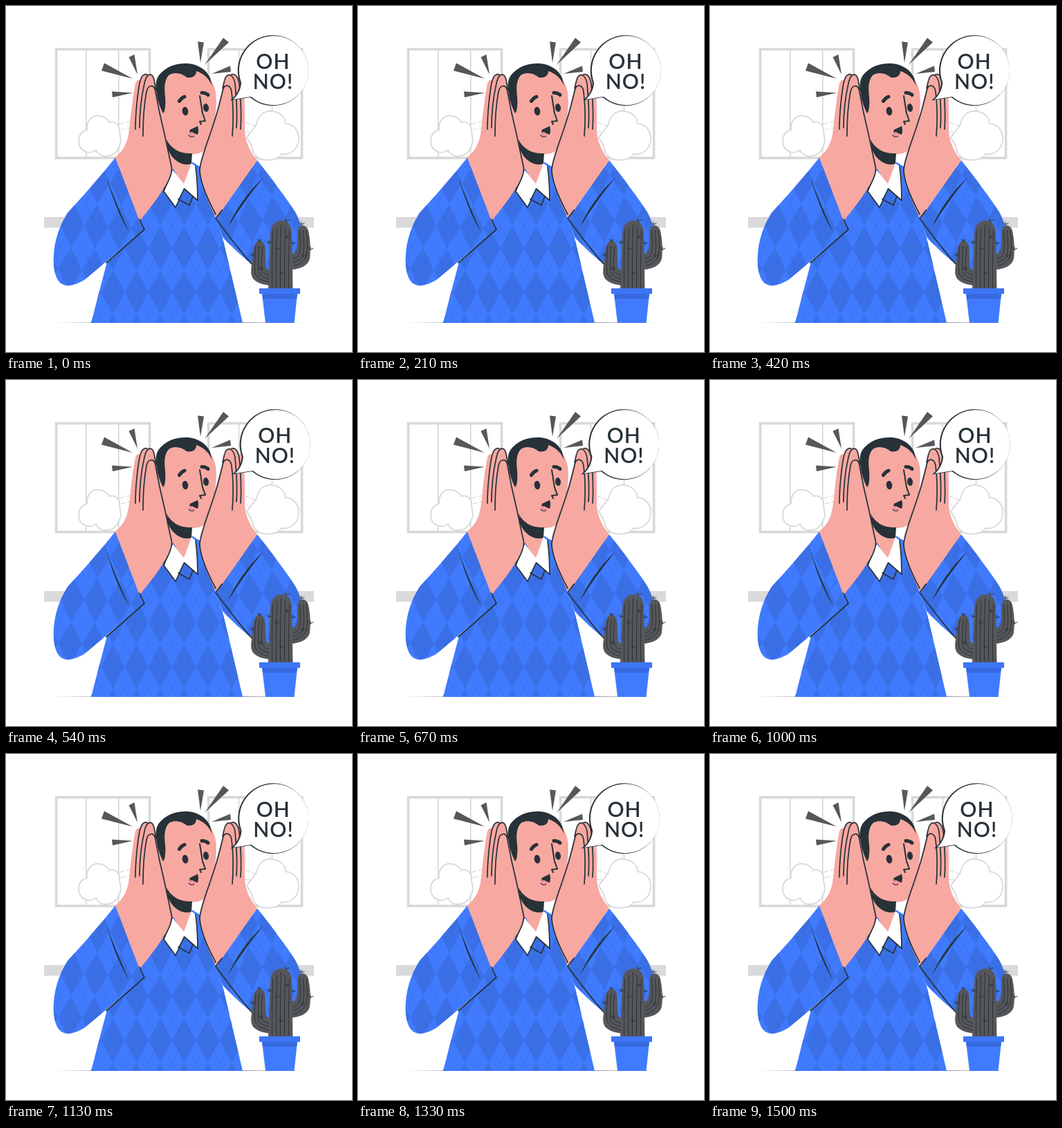
An HTML page that plays this animation: 500 by 500 pixels, repeating every 1540 ms.

```html
<!DOCTYPE html>
<html lang="en">
<head>
<meta charset="utf-8">
<title>Oh no!</title>
<style>
  html, body { margin: 0; width: 100%; height: 100%; overflow: hidden; background: #fff; }
  svg { display: block; width: 100vw; height: 100vh; }
  .ink { fill: none; stroke: #263238; stroke-width: 1.7; stroke-linecap: round; stroke-linejoin: round; }
  .dark { fill: #263238; }
  .skin { fill: #f7a8a1; }
  .blue { fill: #407bff; }
  .deep { fill: #3a6fe6; }
  .gray { fill: #55575b; }
  .white { fill: #fff; }
  .frame { fill: none; stroke: #d8d8db; stroke-width: 3.6; }
  .thin { fill: none; stroke: #d4d4d8; stroke-width: 1.5; }
  .rib { fill: none; stroke: #2d3238; stroke-width: 1; stroke-linecap: round; }
  text { font: 600 30px Lato, "Open Sans", sans-serif; letter-spacing: 1px; fill: #263238; }
</style>
</head>
<body>
<svg viewBox="0 0 500 500">
  <defs>
    <g id="argyle">
      <path class="deep" d="M17.150 0L34.300 32L17.150 64L0 32Z"/>
      <path d="M0 0L34.300 64M34.300 0L0 64" fill="none" stroke="#3464cf" stroke-width=".7" opacity=".7"/>
    </g>
    <pattern id="knit" width="34.300" height="64" patternUnits="userSpaceOnUse" patternTransform="translate(205.800 318)">
      <use href="#argyle"/>
    </pattern>
    <pattern id="knitL" width="34.300" height="64" patternUnits="userSpaceOnUse" patternTransform="translate(77 348) rotate(3)">
      <use href="#argyle"/>
    </pattern>
    <pattern id="knitR" width="34.300" height="64" patternUnits="userSpaceOnUse" patternTransform="translate(333 280) rotate(-6)">
      <use href="#argyle"/>
    </pattern>
    <path id="torso" d="M240 236L193 311L200 323L146 370Q137 404 123 458H342L313 335L303 307L280 232L270 226Z"/>
    <path id="armL" d="M158 219C137 246 110 276 89 299C73 324 68 350 69 372C70 393 77 404 90 404C99 403 106 400 113 396L200 323Z"/>
    <path id="armR" d="M363 223C384 250 404 276 418 298C425 311 429 325 430 340C430 366 418 385 396 389C382 389 368 381 355 373C338 359 322 344 313 334L303 307Z"/>
    <path id="balloon" d="M353 131L327 135C333 130 338 122 339 111A50 50 0 1 1 353 131Z"/>
  </defs>

  <!-- room -->
  <g id="room">
    <rect class="frame" x="72.6" y="62.6" width="135" height="157"/>
    <rect class="frame" x="292.6" y="62.6" width="135" height="157"/>
    <path class="thin" d="M115.8 64V218M162.8 64V218M336.5 64V218M384.5 64V218"/>
    <rect x="55" y="305" width="390" height="15.5" fill="#dadadc"/>
    <g fill="#fff" stroke="#d4d4d8" stroke-width="1.6">
      <path d="M117 179C116 166 124 158 133 158.500C141 159 147 163 149 168C157 165 165 172 164 181L166 196C163 205 160 216 146 217C137 218 132 213 130 208C124 215 105 212 105 195C105 185 111 180 117 179Z"/>
      <path d="M362 171C364 158 373 151 384 152C395 153 403 159 404 170C415 170 424 180 423 193C422 207 411 216 398 214C395 220 386 223 376 222.500C364 222 356 214 356 204L348 190Z"/>
    </g>
    <path class="thin" style="stroke-width:1;stroke-dasharray:7 3" d="M164 171L179 167M166 179L178 176M346 168L362 174M346 181L357 183"/>
  </g>
  <path class="dark" d="M69 457.600L250 457.100L432 457.600L250 458.100Z"/>

  <!-- head -->
  <path class="skin" d="M217 152C220 111 236 91 262 91C285 92 297 102 302 120C307 140 302 180 287 207C284 213 276 214 268 214L268 229L257 264L239 238L222 180Z"/>
  <path class="dark" d="M227 155C218 137 212 112 221 100C231 87 247 82 263 83C277 84 290 92 295 104L298 116C293 104 286 98 275 94C275 101 269 105 261 103C254 97 244 95 237 99C230 104 228 114 230 131C231 140 230 148 229 152Z"/>
  <g class="ink">
    <path style="stroke-width:5" d="M250.500 137.500Q253 133 258 131M283 125.500Q288 125 292 128.500"/>
    <path style="stroke-width:2" d="M280 130L284 155L288 166L280 167L282 171"/>
    <path style="stroke-width:1.100" d="M264 187Q268 191 272 188"/>
  </g>
  <ellipse class="dark" cx="259" cy="152" rx="4.300" ry="6.200" transform="rotate(-8 259 152)"/>
  <ellipse class="dark" cx="289" cy="147" rx="4" ry="6" transform="rotate(-8 289 147)"/>
  <path class="dark" d="M265.500 179L277 173.500Q279 180 277 186L272 184Q269 181 265.500 183Z"/>
  <path d="M264 184Q269 181 273 187Q267 189 264 184Z" fill="#f58fa0"/>

  <!-- sweater and collar -->
  <g id="clothes"></g>
  <path class="skin" d="M237 226L257 264L268 227Z"/>
  <path class="dark" d="M232 193C239 207 252 214 269 213L268 228C255 232 241 224 234 207Z"/>
  <path class="white" d="M240 236L228 268L245 291L257.500 264L277 281L275 233L268 227L257 257Z"/>
  <path class="deep" d="M257.500 264L249 279L265 288L270 275Z"/>
  <path class="ink" d="M240 237L228 268L245 291L257.500 264L277 281Q277 255 274 232M249 279L265 288L270 275"/>

  <!-- hands -->
  <path class="skin" d="M158 219C168 210 176 200 178 178C181 150 184 125 187 112C188 107 192 106 194 108C197 98 203 97 206 99C211 97 214 102 215 108L217 122C220 142 224 163 229 185L240 236C238 248 231 264 193 311Z"/>
  <g class="ink">
    <path d="M187 178C187 152 191 122 193 112C195 102 199 97 204 99"/>
    <path d="M193 176C193 150 197 125 200 112C202 102 206 97 211 100C215 104 215 114 216.500 121"/>
    <path d="M198 188C198 165 200 140 203 124C205 114 213 113 215.500 121C219 141 224 165 229 185L239.500 234C240 243 234 256 228 265"/>
  </g>
  <path class="skin" d="M363 223C352 210 346 196 345 180C345 155 345 130 343 110C341 106 338 106 336 107C334 98 329 97 326 99C320 97 316 103 314 114L311 127C306 148 301 168 295 185C288 205 282 222 280 236C280 252 290 280 304 307Z"/>
  <g class="ink">
    <path d="M339 178C341 150 338 122 337 112C335 102 331 97 326 99"/>
    <path d="M333 176C335 150 332 125 331 112C329 102 324 97 319 101C315 105 315 112 313 119"/>
    <path d="M327 188C329 165 328 140 326 124C325 114 316 112 313.500 121C308 145 301 168 295 185C288 205 281 224 280 236C280 252 288 273 303 301"/>
  </g>

  <!-- sleeve folds -->
  <g class="ink">
    <path d="M193 308L200 323L145 371M312 295L303 307L315 323Q333 347 355 373"/>
  </g>
  <path class="dark" d="M145.500 247C153 270 165 298 178 327C164 304 153 276 145.500 247ZM372 248C354 270 337 293 321 319C332 294 350 268 372 248Z"/>

  <!-- alarm marks -->
  <path class="gray" d="M142 82.500L183 105L138 93.500ZM177.500 74L185.500 70L190 99ZM153 123.500L183 125.500L154 132ZM277 51.500L286 52.500L281 82ZM314 46L322 52.500L287 85ZM324 86.500L325 95L297 98Z"/>

  <!-- cactus -->
  <g class="gray">
    <path d="M379 409C380 378 381 350 382 329C383 316 389 310 398 310C408 310 413 317 413 329L414.500 409Z"/>
    <path d="M365 339.500C359 341 358 349 357 360C355 378 351 388 359 396C366 402 376 403 382 404V381C377 381 375 378 375 370L374.500 350C374 342 370 339 365 339.500Z"/>
    <path d="M428 317C421 318 421 328 421 340C421 352 419 358 413 358V381C425 380 437 375 439 365C441 350 439 335 437 325C435 319 432 317 428 317Z"/>
  </g>
  <g id="ribs" class="rib"></g>
  <path class="blue" d="M370 416H421L416.500 458H375Z"/>
  <path d="M370 416H421L420 423H371Z" fill="#376ae0"/>
  <path d="M366 408H425V416H366Z" fill="#3d75f4"/>

  <!-- speech -->
  <g id="speech">
    <use href="#balloon" fill="#263238" stroke="#263238" stroke-width="1.900"/>
    <use href="#balloon" class="white" transform="translate(1.100 0)"/>
    <text x="361.300" y="90.500">OH</text>
    <text x="356.800" y="120">NO!</text>
  </g>
</svg>
<script>
const byId = id => document.getElementById(id);
const LOOP = 1540, SHAKE = 1520;
// horizontal offset at each tenth of the shake
const STOPS = [0, -1, 2, -4, 4, -4, 4, -4, 2, -1, 0];

byId('clothes').innerHTML = [['torso', 'knit'], ['armL', 'knitL'], ['armR', 'knitR']]
  .map(([shape, knit]) => `<use href="#${shape}" class="blue"/><use href="#${shape}" fill="url(#${knit})"/>`)
  .join('');

function drawRibs() {
  let d = '';
  for (let i = 0; i < 5; i++) {
    const x = 385 + i * 6, top = 316 + Math.abs(i - 2) * 4;
    d += `M${x + .5} ${top}Q${x - 1} 365 ${x - .5} 407`;
  }
  for (let i = 0; i < 3; i++) {
    const a = i * 5;
    d += `M${361 + a} 347Q${358 + a} 372 ${360 + a} ${387 - a / 2}Q${366 + a / 2} ${397 - a} 380 ${399 - a}`;
    d += `M${434 - a} 324Q${437 - a} 348 ${434 - a} ${362 - a / 2}Q${428 - a / 2} ${373 - a} 415 ${376 - a}`;
  }
  const spines = [[405, 311], [427, 316], [380, 343], [440, 352], [356, 361], [366, 340],
    [391, 352], [406, 335], [397, 387], [429, 362], [368, 381], [415, 344]];
  for (const [x, y] of spines) d += `M${x} ${y}l-3-3M${x} ${y}l0-4M${x} ${y}l4-2`;
  byId('ribs').innerHTML = `<path d="${d}"/>`;
}

const bezier = (a, b, s) => 3 * a * s * (1 - s) ** 2 + 3 * b * s * s * (1 - s) + s ** 3;

// cubic-bezier(.25, .1, .25, 1)
function ease(x) {
  let lo = 0, hi = 1;
  for (let i = 0; i < 20; i++) {
    const mid = (lo + hi) / 2;
    if (bezier(.25, .25, mid) < x) lo = mid; else hi = mid;
  }
  return bezier(.1, 1, lo);
}

function shakeAt(ms) {
  const p = Math.min(ms / SHAKE, 1) * 10;
  const i = Math.min(Math.floor(p), 9);
  return STOPS[i] + (STOPS[i + 1] - STOPS[i]) * ease(p - i);
}

function render() {
  const x = shakeAt(performance.now() % LOOP);
  byId('speech').setAttribute('transform', `translate(${x.toFixed(3)} 0)`);
  requestAnimationFrame(render);
}

drawRibs();
render();
</script>
</body>
</html>
```
